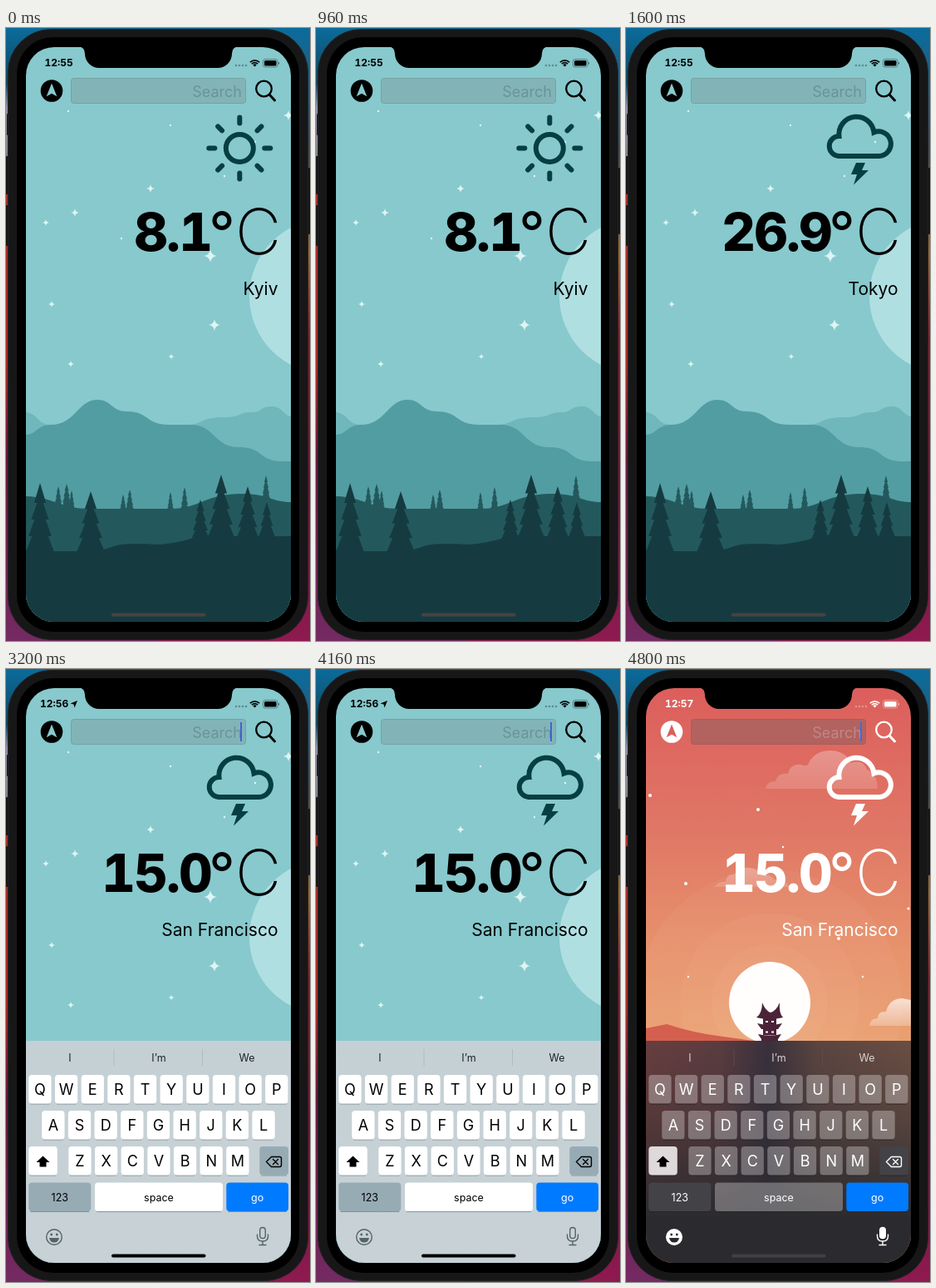
Animation, 366 px wide and 737 px high, one loop 6.4 s. Source, as an HTML page:

```html
<!DOCTYPE html>
<html lang="en">
<head>
<meta charset="utf-8">
<title>Weather app</title>
<style>
html, body { margin: 0; width: 100%; height: 100%; overflow: hidden; background: #000; }
svg {
  display: block; width: 366px; height: 737px;
  font-family: Inter, Roboto, "Liberation Sans", sans-serif;
  animation: theme 6.4s step-end infinite;
}

/* Colours of the day and the dusk look */
@keyframes theme {
  0% {
    --ink: #000; --icon: #053f43; --sky: #87c9cd;
    --field: #82b4b7; --line: #74a1a4; --hint: #6a9497; --caret: #3f62d8;
    --home: #4a4242; --key: #fff; --special: #97abb4; --shift: #fff; --drop: #84949b;
    --text: #000; --word: #1d2427; --rule: #b0bcc1;
    --glyph: #55636a; --solid: none; --face: #55636a;
  }
  50% {
    --ink: #000; --icon: #053f43; --sky: #87c9cd;
    --field: #82b4b7; --line: #74a1a4; --hint: #6a9497; --caret: #3f62d8;
    --home: #000; --key: #fff; --special: #97abb4; --shift: #fff; --drop: #84949b;
    --text: #000; --word: #1d2427; --rule: #b0bcc1;
    --glyph: #55636a; --solid: none; --face: #55636a;
  }
  75% {
    --ink: #fff; --icon: #fff; --sky: #da605d;
    --field: #b2625f; --line: #a85c59; --hint: #bf8787; --caret: #3f6ae0;
    --home: #414044; --key: rgba(255,255,255,.3); --special: #434347; --shift: #ded9da; --drop: #242226;
    --text: #fff; --word: #d9d3d5; --rule: #5e4a4e;
    --glyph: #fff; --solid: #fff; --face: #2a2a2e;
  }
}

/* Which quarters of the loop a part is shown in */
@keyframes q1   { 0% { visibility: visible } 25% { visibility: hidden } }
@keyframes q2   { 0% { visibility: hidden } 25% { visibility: visible } 50% { visibility: hidden } }
@keyframes q3   { 0% { visibility: hidden } 50% { visibility: visible } 75% { visibility: hidden } }
@keyframes q4   { 0% { visibility: hidden } 75% { visibility: visible } }
@keyframes q12  { 0% { visibility: visible } 50% { visibility: hidden } }
@keyframes q34  { 0% { visibility: hidden } 50% { visibility: visible } }
@keyframes q123 { 0% { visibility: visible } 75% { visibility: hidden } }
@keyframes q234 { 0% { visibility: hidden } 25% { visibility: visible } }
.q1, .q2, .q3, .q4, .q12, .q34, .q123, .q234 { animation: 6.4s step-end infinite; }
.q1 { animation-name: q1 } .q2 { animation-name: q2 } .q3 { animation-name: q3 } .q4 { animation-name: q4 }
.q12 { animation-name: q12 } .q34 { animation-name: q34 } .q123 { animation-name: q123 } .q234 { animation-name: q234 }

.ink { fill: var(--ink); }
.clock { font-size: 12px; font-weight: 650; fill: var(--ink); font-variant-numeric: tabular-nums; }
.temp { font-size: 63px; font-weight: 850; letter-spacing: -1.8px; text-anchor: end; font-variant-numeric: tabular-nums; }
.unit { font-size: 76px; font-weight: 250; text-anchor: end; font-optical-sizing: none; }
.degree { font-size: 70px; font-weight: 400; text-anchor: end; }
.city { font-size: 21px; text-anchor: end; }
.hint { font-size: 18px; fill: var(--hint); text-anchor: end; }
.field { fill: var(--field); stroke: var(--line); }
.weather { fill: none; stroke: var(--icon); stroke-width: 6; stroke-linecap: round; }
.key { fill: var(--key); }
.special { fill: var(--special); }
.shift { fill: var(--shift); }
.drop { fill: var(--drop); }
.go { fill: #007aff; }
.letter { font-size: 18px; fill: var(--text); text-anchor: middle; }
.small { font-size: 12.5px; fill: var(--text); text-anchor: middle; }
.word { font-size: 12.5px; fill: var(--word); text-anchor: middle; }
.glyph { fill: none; stroke: var(--glyph); stroke-width: 1.4; stroke-linecap: round; }
</style>
</head>
<body>
<svg viewBox="0 0 366 737">
  <defs>
    <linearGradient id="wallL" x2="0" y2="1">
      <stop stop-color="#0b6c9c"/><stop offset=".09" stop-color="#10465f"/>
      <stop offset=".13" stop-color="#8f91a8"/><stop offset=".2" stop-color="#85878f"/>
      <stop offset=".27" stop-color="#a52f28"/><stop offset=".55" stop-color="#a82a24"/>
      <stop offset=".7" stop-color="#66143a"/><stop offset="1" stop-color="#742a63"/>
    </linearGradient>
    <linearGradient id="wallR" x2="0" y2="1">
      <stop stop-color="#0b6c9c"/><stop offset=".2" stop-color="#404953"/>
      <stop offset=".37" stop-color="#9a6528"/><stop offset=".5" stop-color="#8c1d28"/>
      <stop offset=".75" stop-color="#74123c"/><stop offset="1" stop-color="#8e1a50"/>
    </linearGradient>
    <linearGradient id="dusk" gradientUnits="userSpaceOnUse" x1="0" y1="23" x2="0" y2="447">
      <stop stop-color="#dc5e5c"/><stop offset=".42" stop-color="#e07866"/>
      <stop offset=".75" stop-color="#e7936c"/><stop offset="1" stop-color="#e9a070"/>
    </linearGradient>
    <linearGradient id="haze" x2="0" y2="1">
      <stop stop-color="#fff" stop-opacity=".29"/><stop offset="1" stop-color="#fff" stop-opacity=".15"/>
    </linearGradient>
    <linearGradient id="haze2" x2="0" y2="1">
      <stop stop-color="#fff" stop-opacity=".7"/><stop offset="1" stop-color="#fff" stop-opacity=".25"/>
    </linearGradient>
    <linearGradient id="panel" x2="0" y2="1">
      <stop stop-color="#c5d0d5"/><stop offset="1" stop-color="#c7d1d6"/>
    </linearGradient>
    <linearGradient id="tint">
      <stop stop-color="#683e3e"/><stop offset=".28" stop-color="#5a3c40"/>
      <stop offset=".46" stop-color="#38303c"/><stop offset=".64" stop-color="#5a4440"/><stop offset="1" stop-color="#6a4e43"/>
    </linearGradient>
    <linearGradient id="shade" x2="0" y2="1">
      <stop stop-color="#2b2b2f" stop-opacity="0"/><stop offset=".35" stop-color="#2b2b2f" stop-opacity=".3"/>
      <stop offset=".8" stop-color="#2b2b2f"/>
    </linearGradient>
    <clipPath id="screen"><rect x="24" y="23" width="319" height="691" rx="34"/></clipPath>
    <path id="tree" d="M0 0 .42 .29H.22L.62 .53H.4L.82 .77H.58L1 1H-1L-.58 .77H-.82L-.4 .53H-.62L-.22 .29H-.42Z"/>
    <path id="spark" d="M0-1Q.12-.12 1 0 .12 .12 0 1-.12 .12-1 0-.12-.12 0-1Z"/>
    <path id="cloud" d="M257 154H304.5A14.8 14.8 0 1 0 298.5 125.5A21.1 21.1 0 0 0 256.5 130A12 12 0 0 0 257 154Z"/>
  </defs>

  <!-- desktop and phone body -->
  <rect width="183" height="737" fill="url(#wallL)"/>
  <rect x="183" width="183" height="737" fill="url(#wallR)"/>
  <g fill="#141415">
    <rect x="1" y="103" width="4" height="26" rx="1"/>
    <rect x="0" y="154" width="4" height="46" rx="1"/>
    <rect x="0" y="213" width="4" height="49" rx="1"/>
    <rect x="362" y="168" width="4" height="80" rx="1"/>
  </g>
  <rect x="2.5" y="1.5" width="361" height="734" rx="52" fill="#171718" stroke="#232325"/>
  <rect x="13" y="11" width="340" height="715" rx="44" fill="#000"/>

  <g clip-path="url(#screen)">
    <!-- day scene -->
    <g class="q123">
      <rect x="24" y="23" width="319" height="691" fill="#87c9cd"/>
      <circle cx="386" cy="322.5" r="93" fill="#b0dfe2"/>
      <g id="stars" fill="#def4f4"></g>
      <path fill="#70b7bb" d="M24 462C38 463 38 476 52 477H215C240 477 232 468 262 468C285 468 278 462 296 462C308 462 306 455 320 455C333 455 334 466 343 467V714H24Z"/>
      <path fill="#529da2" d="M24 489C36 489 38 477 54 477C84 477 86 447 110 447C128 447 126 461 146 461C172 461 168 477 196 477H222C252 477 250 504 280 504C312 504 302 521 334 521H343V714H24Z"/>
      <g fill="#23595d">
        <path d="M24 563C60 564 62 578 102 578H200C232 578 240 560 285 560C315 560 320 570 343 570V714H24Z"/>
        <g id="farTrees"></g>
      </g>
      <g fill="#153b41">
        <path d="M24 627Q38 629 58 629H103Q118 628 130 623T185 621Q207 619 226 613T262 611H343V714H24Z"/>
        <g id="nearTrees"></g>
      </g>
    </g>

    <!-- dusk scene -->
    <g class="q4">
      <rect x="24" y="23" width="319" height="691" fill="url(#dusk)"/>
      <g fill="#fff" fill-opacity=".03">
        <circle cx="173" cy="401" r="160"/><circle cx="173" cy="401" r="108"/><circle cx="173" cy="401" r="70"/>
      </g>
      <circle cx="173" cy="401" r="49" fill="#fffefd"/>
      <g id="dots" fill="#fff"></g>
      <path fill="url(#haze)" d="M168 144Q169 135 180 135Q183 124 195 126Q198 113 211 115Q219 119 221 111Q229 98 247 98Q265 99 271 113Q285 108 290 121Q303 126 303 144Z"/>
      <path fill="url(#haze)" d="M107 262Q110 255 120 256Q121 246 130 247Q137 237 149 239Q160 240 163 248Q173 245 178 253Q193 253 196 262Z"/>
      <path fill="url(#haze2)" d="M293 429Q294 420 303 420Q303 411 313 412Q317 396 333 396L343 398V429Z"/>
      <path fill="#d45f4e" d="M24 432 49 427Q80 437 110 441T160 448H24Z"/>
      <g fill="#4b2338">
        <path d="M157 419Q164 414 164 401Q168 411 174 413Q181 411 185 401Q184 414 189 419Q173 423 157 419Z"/>
        <path d="M165 420H181V428H165ZM158 426Q173 430 188 426L183 433H163ZM165 433H181V440H165ZM159 439Q173 442 187 439L183 445V448H163V445Z"/>
      </g>
      <path stroke="#fffefd" stroke-width="2" d="M168 424H171M175 424H178M168 436.500H171M175 436.500H178"/>
    </g>

    <!-- status bar -->
    <text class="clock q12" x="46.500" y="46">12:55</text>
    <g class="q3">
      <text class="clock" x="41" y="46">12:56</text>
      <path d="M86 38 82.500 46.500 81.500 42.500 77.500 41.500Z"/>
    </g>
    <text class="clock q4" x="47" y="46">12:57</text>
    <g class="ink">
      <g opacity=".3">
        <circle cx="277" cy="45" r="1.300"/><circle cx="281" cy="45" r="1.300"/>
        <circle cx="285" cy="45" r="1.300"/><circle cx="289" cy="45" r="1.300"/>
      </g>
      <path d="M299.500 46.500 297.300 44.200Q299.500 42.400 301.700 44.200Z"/>
      <rect x="311" y="39" width="14.500" height="6.500" rx="1.500"/>
      <path d="M328 40.500Q329.500 42.200 328 44Z"/>
    </g>
    <g fill="none" style="stroke:var(--ink)">
      <path stroke-width="1.600" d="M293.800 41.200Q299.500 36.400 305.200 41.200M295.800 43.200Q299.500 40 303.200 43.200"/>
      <rect x="309.500" y="37.500" width="17.500" height="9.500" rx="2.500" stroke-width=".8" opacity=".45"/>
    </g>

    <!-- search row -->
    <circle class="ink" cx="55" cy="75.500" r="13.300"/>
    <path style="fill:var(--sky)" d="M55 66.500 61.300 82.300 55 78.800 48.700 82.300Z"/>
    <rect class="field" x="78.500" y="60.500" width="210" height="30" rx="3"/>
    <text class="hint" x="284" y="82.500">Search</text>
    <rect class="q34" x="282" y="64" width="2" height="23" style="fill:var(--caret)"/>
    <g fill="none" stroke-linecap="round" style="stroke:var(--ink)">
      <circle cx="310.500" cy="73" r="9.300" stroke-width="2.300"/>
      <path stroke-width="3" d="M317.500 80.500 323.500 87"/>
    </g>

    <!-- weather -->
    <g class="weather q1" transform="translate(281.300 144.500)">
      <circle r="16.500"/>
      <g id="rays"></g>
    </g>
    <g class="q234">
      <use href="#cloud" class="weather"/>
      <path style="fill:var(--icon)" d="M277 162H288L284 171H292L274 188.500 278 176H271Z"/>
    </g>
    <g class="ink">
      <text class="degree" x="276" y="271">°</text>
      <text class="unit" x="331" y="272">C</text>
      <g class="q1"><text class="temp" x="247" y="267.500">8.1</text><text class="city" x="327.500" y="320.500">Kyiv</text></g>
      <g class="q2"><text class="temp" x="247" y="267.500">26.9</text><text class="city" x="327.500" y="320.500">Tokyo</text></g>
      <g class="q34"><text class="temp" x="247" y="267.500">15.0</text><text class="city" x="327.500" y="320.500">San Francisco</text></g>
    </g>

    <!-- keyboard -->
    <g class="q34">
      <rect class="q3" x="24" y="447" width="319" height="267" fill="url(#panel)"/>
      <g class="q4">
        <rect x="24" y="447" width="319" height="267" fill="url(#tint)"/>
        <rect x="24" y="447" width="319" height="267" fill="url(#shade)"/>
      </g>
      <path style="stroke:var(--rule)" d="M130 457V477M236.500 457V477"/>
      <text class="word" x="77" y="471.500">I</text>
      <text class="word" x="184" y="471.500">I’m</text>
      <text class="word" x="290" y="471.500">We</text>
      <g id="keys"></g>
      <path d="M44.500 585.500 52.500 593H48.500V598.500H40.500V593H36.500Z"/>
      <path class="glyph" style="stroke:var(--text)" d="M319.500 586.500H329.500Q331.500 586.500 331.500 588.500V596.500Q331.500 598.500 329.500 598.500H319.500L313.500 592.500ZM321.500 589.500 327.500 595.500M327.500 589.500 321.500 595.500"/>
      <circle class="glyph" cx="58" cy="683" r="9.300" style="fill:var(--solid)"/>
      <g style="fill:var(--face)">
        <circle cx="54.700" cy="680" r="1.400"/><circle cx="61.300" cy="680" r="1.400"/>
        <path d="M52 684H64Q63 689.500 58 689.500T52 684Z"/>
      </g>
      <rect class="glyph" x="305.700" y="671.500" width="6.600" height="13" rx="3.300" style="fill:var(--solid)"/>
      <path class="glyph" d="M302.500 680V682Q302.500 688 309 688T315.500 682V680M309 688V692.500M305 692.500H313"/>
    </g>
    <rect x="127" y="703.500" width="113.500" height="4" rx="2" style="fill:var(--home)"/>
  </g>
  <path d="M87 22H280Q272 23 272 31A17 17 0 0 1 255 48H112A17 17 0 0 1 95 31Q95 23 87 22Z"/>
</svg>
<script>
const fill = (id, list, draw) =>
  document.getElementById(id).innerHTML = list.map(draw).join('');

const tree = ([x, top, half, bottom]) =>
  `<use href="#tree" transform="translate(${x} ${top}) scale(${half} ${bottom - top})"/>`;
const spark = ([x, y, r]) =>
  `<use href="#spark" transform="translate(${x} ${y}) scale(${r})"/>`;
const dot = ([x, y, r]) => `<circle cx="${x}" cy="${y}" r="${r}"/>`;

fill('farTrees', [[63, 551, 5, 576], [73, 548, 6, 577], [79, 556, 4, 578], [141, 561, 4, 579],
  [149, 555, 5, 579], [198, 558, 4, 579], [215, 552, 5, 579], [313, 538, 5, 566]], tree);
fill('nearTrees', [[41, 547, 17, 630], [102, 557, 17, 630], [234, 567, 11, 615],
  [259, 537, 17, 615], [291, 551, 14, 615], [314, 570, 12, 624]], tree);
fill('stars', [[174, 193, 5], [83, 222, 5], [48, 234, 4], [246, 274, 8], [55, 332, 4], [251, 357, 7],
  [78, 404, 4], [340, 105, 6], [199, 395, 3.5]], spark);
document.getElementById('stars').innerHTML += [[75, 100], [198, 117], [263, 63], [155, 85],
  [139, 253], [263, 178], [300, 137]].map(p => dot([...p, 1.2])).join('');
fill('dots', [[29, 152, 2], [159, 169, 2], [72, 258, 2], [189, 214, 1.2], [256, 324, 2],
  [75, 370, 1.2], [340, 288, 1.5], [285, 370, 1.2]], dot);
fill('rays', [0, 1, 2, 3, 4, 5, 6, 7], i => `<path d="M0-30V-37" transform="rotate(${i * 45})"/>`);

const key = (x, y, w, kind, label = '', font = 'letter') => {
  const box = (dy, cls) =>
    `<rect class="${cls}" x="${x}" y="${y + dy}" width="${w}" height="34.5" rx="4"/>`;
  const base = font === 'letter' ? 24 : 22;
  const paint = kind === 'go' ? ' style="fill:#fff"' : '';
  // a thin lip below the key, so that see-through keys keep the panel colour
  const lip = `<path class="drop" d="M${x + 2} ${y + 34.5}h${w - 4}v1h${4 - w}z"/>`;
  return lip + box(0, kind) +
    `<text class="${font}" x="${x + w / 2}" y="${y + base}"${paint}>${label}</text>`;
};
const row = (letters, x, y) =>
  [...letters].map((c, i) => key(x + i * 31.65, y, 27.3, 'key', c)).join('');

document.getElementById('keys').innerHTML =
  row('QWERTYUIOP', 27.3, 488) + row('ASDFGHJKL', 43.2, 531) + row('ZXCVBNM', 75.3, 574) +
  key(27.3, 574, 34.5, 'shift') + key(305.3, 574, 34.7, 'special') +
  key(27.3, 617.5, 75, 'special', '123', 'small') +
  key(107, 617.5, 154, 'key', 'space', 'small') +
  key(265.3, 617.5, 74.7, 'go', 'go', 'small');
</script>
</body>
</html>
```
